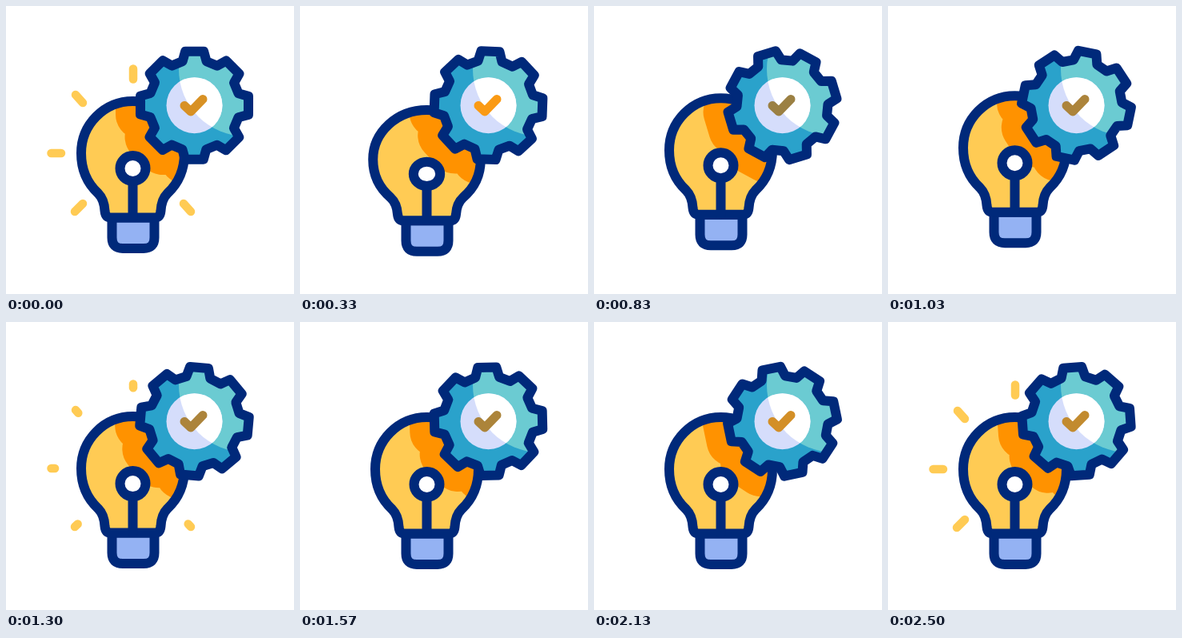
Animation, 360 px wide and 360 px high, one loop 2.53 s. Source, as an HTML page with a canvas:

```html
<!DOCTYPE html>
<html lang="en">
<head>
<meta charset="utf-8">
<title>Idea and gear</title>
<style>
  html, body { margin: 0; width: 100%; height: 100%; overflow: hidden; background: #fff; }
  canvas { display: block; width: 360px; height: 360px; }
</style>
</head>
<body>
<canvas id="stage" width="360" height="360"></canvas>
<script>
const ctx = document.getElementById('stage').getContext('2d');
const LOOP = 2530;
const TAU = Math.PI * 2;
const NAVY = '#00297a';
const YELLOW = '#ffcb54';
const LINE = 12;
const NECK_Y = 264.5;
const GEAR = { x: 235.5, y: 124.2, teeth: 8 };
const SHADE_REACH = 26;

const glass = new Path2D(
  'M131 264.5C126 264.5 124 261 123.5 256C123 247 121 240 115 234' +
  'C101 221 94 204 94 184A64.5 65 0 0 1 223 184C223 204 216 221 202 234' +
  'C196 240 194 247 193.5 256C193 261 191 264.5 186 264.5Z');
const base = new Path2D(
  'M132.5 264.5V289.5Q132.5 303 146 303H172Q185.5 303 185.5 289.5V264.5Z');
const stem = new Path2D('M158.5 219V264');
const check = new Path2D('M223 124.5L231 132L246 116.5');

// Outer end first, inner end second.
const rays = [
  [86, 257, 96, 247],
  [56.5, 184, 69, 184],
  [87, 111, 96, 121],
  [159, 78.5, 159, 91.5],
  [231, 257, 222, 247]
];
const rayBursts = [400, 1055, 1710, 2365];

const moveKeys = [[0, 0], [60, 0], [530, 6.2], [980, -7], [1400, 0], [LOOP, 0]];
const tintKeys = [[0, .3], [330, 0], [630, 1], [1030, .7], [1570, .7], [2130, .35], [2500, .5], [LOOP, .3]];

const clamp = v => Math.min(1, Math.max(0, v));
const mix = (a, b, p) => a + (b - a) * p;
const ease = p => (1 - Math.cos(Math.PI * p)) / 2;

function sample(keys, t) {
  const i = Math.max(1, keys.findIndex(k => k[0] >= t));
  const [t0, v0] = keys[i - 1], [t1, v1] = keys[i];
  return mix(v0, v1, ease(clamp((t - t0) / (t1 - t0))));
}

function gearPath(angle) {
  const path = new Path2D();
  for (let i = 0; i < GEAR.teeth; i++) {
    const a = angle + i * TAU / GEAR.teeth;
    const sin = Math.sin(a), cos = Math.cos(a);
    for (const [side, r] of [[-15, 55], [-11.5, 67.5], [11.5, 67.5], [15, 55]]) {
      path.lineTo(GEAR.x + side * cos + r * sin, GEAR.y + side * sin - r * cos);
    }
  }
  path.closePath();
  return path;
}

function circle(x, y, r) {
  const path = new Path2D();
  path.arc(x, y, r, 0, TAU);
  return path;
}

function paint(path, fill, line, width = LINE) {
  if (fill) {
    ctx.fillStyle = fill;
    ctx.fill(path);
  }
  if (line) {
    ctx.strokeStyle = line;
    ctx.lineWidth = width;
    ctx.stroke(path);
  }
}

function clipped(path, draw) {
  ctx.save();
  ctx.clip(path);
  draw();
  ctx.restore();
}

function drawRays(t, dy) {
  const burst = rayBursts.find(s => (t - s + LOOP) % LOOP < 290);
  if (burst === undefined) return;
  const u = (t - burst + LOOP) % LOOP;
  const shown = ease(clamp(u / 110));
  const gone = clamp((u - 170) / 120);
  rays.forEach(([ox, oy, ix, iy], n) => {
    if (n === rays.length - 1 && u < 150) return;
    const path = new Path2D();
    path.moveTo(mix(ix, ox, gone), mix(iy, oy, gone) + dy);
    path.lineTo(mix(ix, ox, shown), mix(iy, oy, shown) + dy);
    paint(path, null, YELLOW, 10.5);
  });
}

function drawBulb(t, gear, dy) {
  const squash = Math.sin(Math.PI * clamp((t - 60) / 540));
  const lifted = new DOMMatrix().translate(0, dy);
  // The glass squashes onto its neck; the base only rides along.
  const squashed = lifted
    .translate(158.5, NECK_Y)
    .scale(1 + .043 * squash, 1 - .05 * squash)
    .translate(-158.5, -NECK_Y);
  const posed = (path, pose) => {
    const out = new Path2D();
    out.addPath(path, pose);
    return out;
  };
  const shell = posed(glass, squashed);

  paint(posed(base, lifted), '#94b2f3', NAVY);
  paint(shell, YELLOW);
  // The gear's wide shade follows its teeth across the glass.
  clipped(shell, () => paint(gear, '#ff9200', '#ff9200', SHADE_REACH * 2 + 10));
  paint(shell, null, NAVY);
  paint(posed(stem, squashed), null, NAVY);
  paint(posed(circle(158.5, 203, 16), squashed), '#fff', NAVY);
}

function drawGear(t, gear) {
  const light = circle(300, 79, 84);
  const disc = circle(GEAR.x, GEAR.y, 35);
  paint(gear, '#2aa2cb');
  clipped(gear, () => paint(light, '#6bcbd2'));
  paint(disc, '#d5ddfb');
  clipped(disc, () => paint(light, '#fff'));
  paint(gear, null, NAVY);

  const tint = sample(tintKeys, t);
  const rgb = [[250, 138], [154, 123], [20, 75]].map(([a, b]) => Math.round(mix(a, b, tint)));
  paint(check, null, `rgb(${rgb})`, 11);
}

function frame(now) {
  const t = now % LOOP;
  const gear = gearPath(t / LOOP * TAU);
  const dy = sample(moveKeys, t);
  ctx.fillStyle = '#fff';
  ctx.fillRect(0, 0, 360, 360);
  ctx.lineCap = ctx.lineJoin = 'round';
  drawRays(t, dy);
  drawBulb(t, gear, dy);
  drawGear(t, gear);
}

const start = performance.now();
function tick() {
  frame(performance.now() - start);
  requestAnimationFrame(tick);
}
tick();
</script>
</body>
</html>
```
